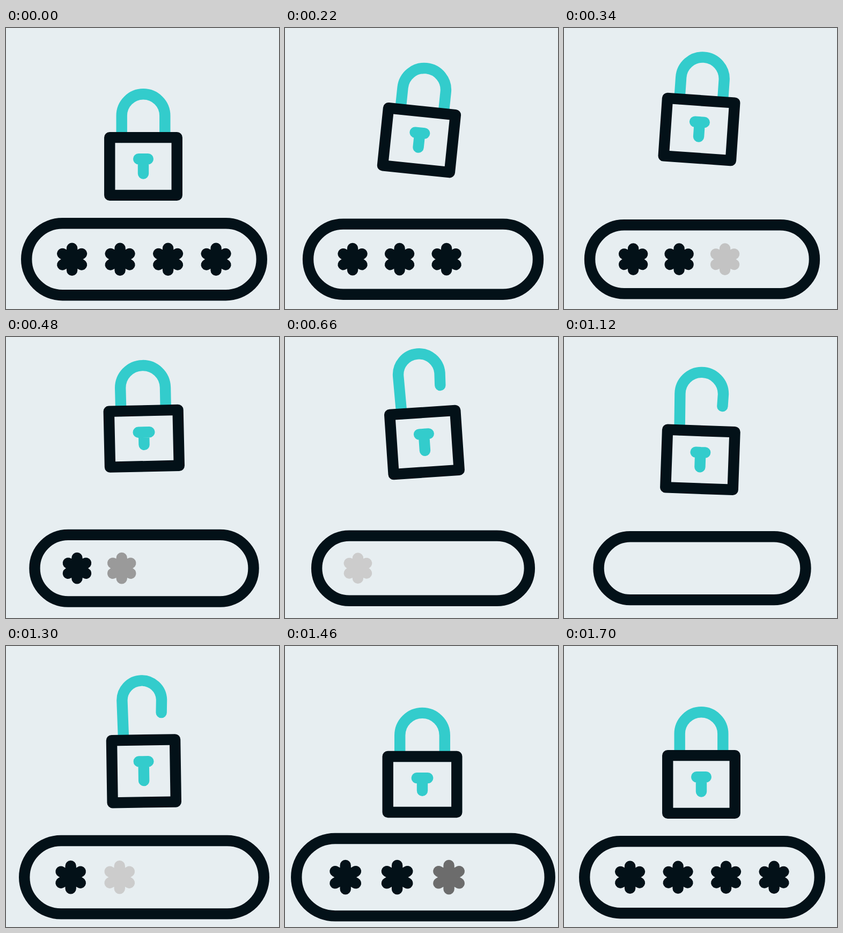
Animation, 509 px wide and 524 px high, one loop 1800 ms. Source, as an HTML page:

```html
<!DOCTYPE html>
<html lang="en">
<head>
<meta charset="utf-8">
<title>Padlock and password</title>
<style>
  html, body { margin: 0; width: 100%; height: 100%; overflow: hidden; background: #e7eef1; }
  svg { display: block; width: 100%; height: 100%; }
  svg * { fill: none; stroke-width: 20.4; stroke-linecap: round; stroke-linejoin: round; }
  .dark { stroke: #031118; }
  .teal { stroke: #33cccc; }
</style>
</head>
<body>
<svg viewBox="0 0 509 524">
  <g id="lock">
    <path id="shackle" class="teal"/>
    <rect id="body" class="dark"/>
    <path id="keyhole" class="teal"/>
  </g>
  <rect id="pill" class="dark"/>
  <g id="stars"></g>
</svg>
<script>
const LOOP = 1800, FADE = 100;
const $ = id => document.getElementById(id);
const set = (el, attrs) => { for (const k in attrs) el.setAttribute(k, attrs[k]); };

// Easing from 0 to 1 between two times; bump rises to 1 and returns to 0
const part = (t, from, to) => Math.max(0, Math.min(1, (t - from) / (to - from)));
const ramp = (t, from, to) => { const u = part(t, from, to); return u * u * (3 - 2 * u); };
const easeOut = (t, from, to) => Math.sin(part(t, from, to) * Math.PI / 2);
const bump = (t, mid, reach) => Math.cos(part(Math.abs(t - mid), 0, reach) * Math.PI / 2) ** 2;

// The lock jumps, sinks slowly, then drops back
const lockY = t => 258 - 69 * easeOut(t, 100, 340)
  + 44 * ramp(t, 440, 1280) + 25 * ramp(t, 1290, 1440);

// Dying swing
const angle = t => 6 * Math.exp((220 - t) / 1000) * Math.sin(2 * Math.PI * (t - 45) / 800)
  * ramp(t, 100, 200) * (1 - ramp(t, 1300, 1440));

// Squash before each burst of speed and on landing, stretch during it
const stretch = t => .041 * bump(t, 620, 140) - .035 * bump(t, 480, 120)
  + .078 * bump(t, 1300, 110) - .035 * bump(t, 1440, 130);

const opening = t => ramp(t, 460, 553) - ramp(t, 1310, 1430);

const pillScale = t => 1 - .12 * easeOut(t, 110, 1050)
  + .204 * ramp(t, 1120, 1410) - .084 * ramp(t, 1410, 1700);

const stars = [0, 1, 2, 3].map(() =>
  $('stars').appendChild(document.createElementNS('http://www.w3.org/2000/svg', 'path')));

function drawLock(t) {
  const a = angle(t), q = stretch(t), open = opening(t);
  const sy = 1 + q, sx = 1 - .75 * q;
  set($('lock'), { transform: `translate(${256 - 1.03 * a} ${lockY(t)}) rotate(${a})` });

  const w = 125.5 * sx, h = 107.7 * sy;
  set($('body'), { x: -w / 2, y: -h / 2, width: w, height: h });

  const r = 40.3 * sx ** 1.5, base = -54 * sy;
  const mid = (-94.4 - 27.4 * open - 8 * bump(t, 570, 80)) * sy;
  const end = mid + (40 - 17.5 * open) * sy;
  set($('shackle'), {
    d: `M${-r} ${base}V${mid}A${r} ${r} 0 0 1 ${r} ${mid}L${r - 1.3 * open} ${end}`,
    transform: `rotate(${-1.3 * open} ${-r} ${base})`
  });

  const ky = 1 + 4 * q, bar = 8.8 * (1 + Math.max(0, -5 * q)), top = -13.7 * ky;
  set($('keyhole'), { d: `M${-bar} ${top}H${bar}M0 ${top}V${top + 27.2 * ky}` });
}

function drawField(t) {
  const s = pillScale(t), cx = 257.5, cy = 431.2;
  const w = 438.6 * s, h = 134 * s;
  set($('pill'), { x: cx - w / 2, y: cy - h / 2, width: w, height: h, rx: h / 2 });

  const r = 20.6 * s, dx = r * Math.sqrt(3) / 2, dy = r / 2;
  stars.forEach((star, i) => {
    const gone = 672 - 158 * i, back = 1170 + 118 * i;
    const shown = 1 - part(t, gone - FADE, gone) + part(t, back, back + FADE);
    const grey = Math.round(231 - 227 * shown);
    set(star, {
      d: `M0 ${-r}V${r}M${-dx} ${-dy}L${dx} ${dy}M${-dx} ${dy}L${dx} ${-dy}`,
      transform: `translate(${cx + (89.5 * i - 134.4) * s} ${cy})`,
      stroke: shown === 1 ? '#031118' : `rgb(${grey},${grey},${grey})`,
      visibility: shown > 0 ? 'visible' : 'hidden'
    });
  });
}

function draw(t) {
  drawLock(t);
  drawField(t);
}

let start;
function tick(now) {
  start ??= now;
  draw(Math.max(0, now - start) % LOOP);
  requestAnimationFrame(tick);
}
draw(0);
requestAnimationFrame(tick);
</script>
</body>
</html>
```
